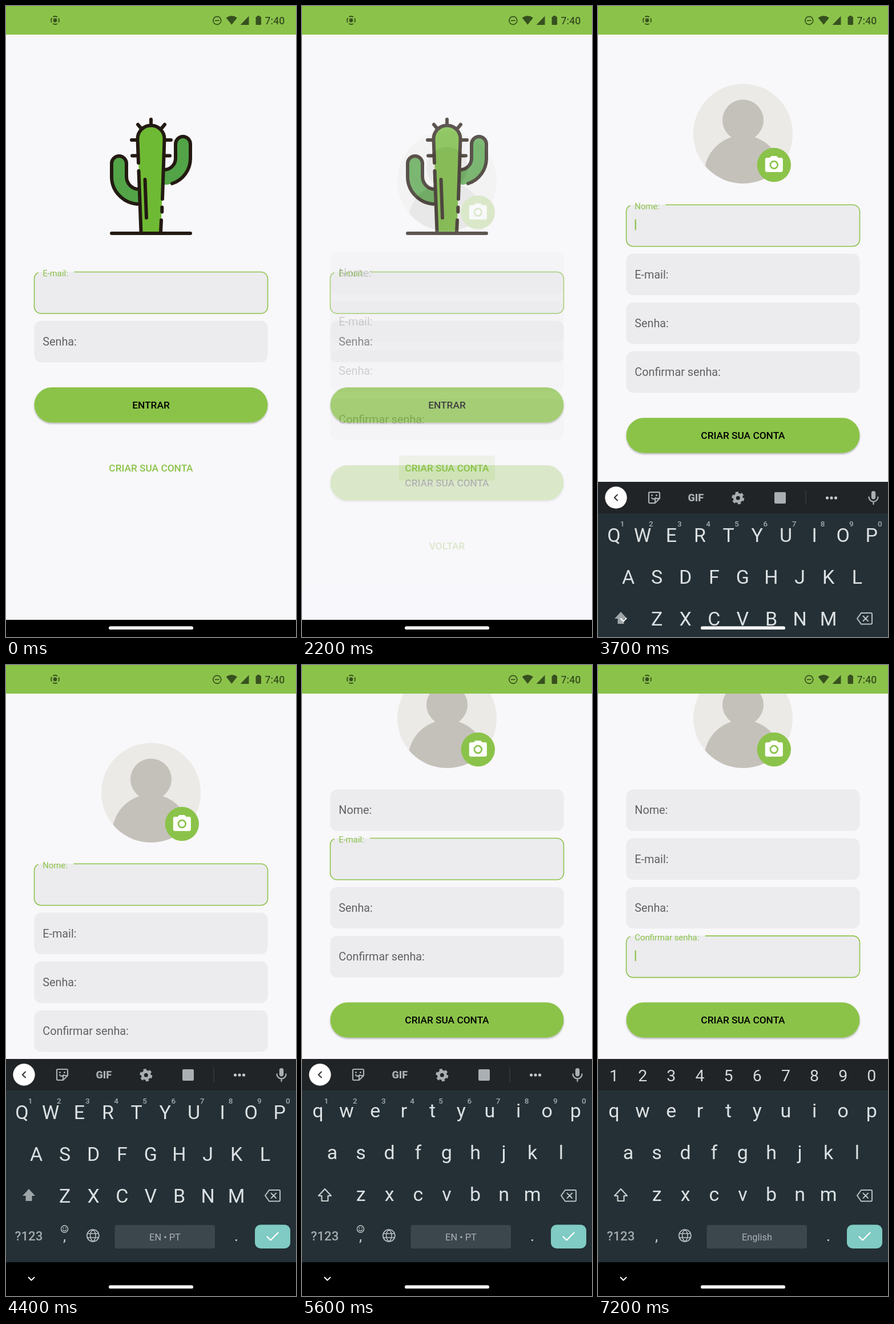
Recreate the animation shown at these times as an HTML page. Size 508x1102 px, loop 7.3 s.

```html
<!DOCTYPE html>
<html lang="pt">
<head>
<meta charset="utf-8">
<title>Criar conta</title>
<style>
  html, body { margin: 0; width: 100%; height: 100%; overflow: hidden; background: #f8f7fa; }
  svg { display: block; width: 100vw; height: 100vh; font-family: Roboto, sans-serif; }
  .mid { text-anchor: middle; }
  .btn { font-size: 17.3px; font-weight: 500; text-anchor: middle; }
  .key { font-size: 34px; fill: #dce1e3; text-anchor: middle; }
  .line { fill: none; stroke-linecap: round; stroke-linejoin: round; }
</style>
</head>
<body>
<svg id="stage" viewBox="0 0 508 1102"></svg>
<script>
const GREEN = '#8bc34a', PAPER = '#f8f7fa', BARK = '#231a12', DARK = '#37501f', ICON = '#a9afb2';
const LOOP = 7300, STEP = 100;
const stage = document.getElementById('stage');

const text = (x, y, str, attrs = '') => `<text x="${x}" y="${y}" ${attrs}>${str}</text>`;
const rect = (x, y, w, h, r, fill, attrs = '') =>
  `<rect x="${x}" y="${y}" width="${w}" height="${h}" rx="${r}" fill="${fill}" ${attrs}/>`;
const circle = (x, y, r, fill, attrs = '') => `<circle cx="${x}" cy="${y}" r="${r}" fill="${fill}" ${attrs}/>`;
const line = (d, color, width, attrs = '') =>
  `<path class="line" d="${d}" stroke="${color}" stroke-width="${width}" ${attrs}/>`;
const ring = (x, y, r, color, width, attrs = '') =>
  circle(x, y, r, 'none', `stroke="${color}" stroke-width="${width}" ${attrs}`);

const field = (id, top, label) => `<g id="${id}" data-top="${top}">
  ${rect(49.5, top, 409, 72.5, 12, '#ecebee')}
  <path class="line outline" stroke="${GREEN}" stroke-width="1.6"/>
  ${text(64.3, top + 43, label, 'class="label"')}
  ${rect(64.6, top + 25.5, 2.2, 18.5, 0, GREEN, 'class="cursor"')}</g>`;

const button = (y, label) =>
  rect(49.5, y, 409, 61.5, 30.7, GREEN, 'filter="url(#shadow)"') +
  text(254, y + 37, label, 'class="btn"');

const cactus = () => `
  <path fill="#52a447" d="M236 346A51 48 0 0 1 185 298V275a13 13 0 0 1 26 0V298a22 22 0 0 0 25 22Z"/>
  <path fill="#52a447" d="M274 286A23 22 0 0 0 297 266V241a13 13 0 0 1 26 0V266A46 46 0 0 1 274 312Z"/>
  <path fill="#6fba34" d="M237 396L230.5 232a23.5 23.5 0 0 1 47 0L271 396Z"/>` +
  line(`M234 346A49 48 0 0 1 185 298V275a13 13 0 0 1 26 0V298a22 22 0 0 0 22 22
    M278 286A20 20 0 0 0 297 266V241a13 13 0 0 1 26 0V266A46 46 0 0 1 291 310
    M232 274L230.5 232a23.5 23.5 0 0 1 47 0L274 337M273.3 351.500V359.500M272 374L271 395
    M232.500 288L236.500 395M243.500 303L246 370M185 397H323
    M254 198V207M231 207L236 213M278 207L273 213
    M220 234H229M221 261.500H230M280 234H289M279 261.500H287`, BARK, 6);

const avatar = () =>
  circle(254, 223, 87, '#ebeae6') +
  `<g clip-path="url(#face)" fill="#c4c1ba">${circle(254, 199.500, 36, '#c4c1ba')}${circle(254, 294, 68, '#c4c1ba')}</g>` +
  circle(308.3, 277.5, 29.7, GREEN) +
  `<path fill="#fff" transform="translate(289.700 258.900) scale(1.55)" fill-rule="evenodd"
    d="M9 2L7.170 4H4a2 2 0 0 0-2 2V18a2 2 0 0 0 2 2H20a2 2 0 0 0 2-2V6a2 2 0 0 0-2-2H16.830L15 2ZM12 7a5 5 0 0 1 0 10a5 5 0 0 1 0-10Z"/>` +
  circle(308.3, 277.5, 5, '#fff');

const statusBar = () =>
  rect(0, 0, 508, 50, 0, GREEN) +
  circle(86, 25, 3.4, DARK) + ring(86, 25, 7, DARK, 1.8, 'stroke-dasharray="8 3" stroke-dashoffset="4"') +
  ring(369.8, 25.3, 7, DARK, 1.7) + line('M366.500 25.300H373', DARK, 1.7) +
  `<path fill="${DARK}" d="M385.500 20.500Q395.300 13.500 405 20.500L395.300 32.800ZM410.500 33L425.500 17.500V33Z"/>` +
  rect(437.5, 18.5, 9.5, 14.5, 1.5, DARK) + rect(440, 17, 4.5, 3, 0, DARK) +
  text(453.5, 31.7, '7:40', `font-size="17.6" font-weight="500" fill="${DARK}"`);

const firstX = i => 28 + 50.15 * i, nextX = i => 53 + 50.1 * i;

function letters(id, base, upper) {
  const rows = [['qwertyuiop', firstX], ['asdfghjkl', nextX], ['zxcvbnm', i => nextX(i + 1)]];
  const keys = rows.map(([row, at], r) => [...row].map((c, i) =>
    text(at(i), base + 73 * r, upper ? c.toUpperCase() : c, 'class="key"')).join('')).join('');
  const arrow = 'M40 915L51 927H45.500V936H34.500V927H29Z';
  const shift = upper ? `<path d="${arrow}" fill="#9fa6a9"/>` : line(arrow, '#c8cdcf', 2.2);
  return `<g id="${id}">${keys}${shift}</g>`;
}

const digits = (y, dx, attrs) =>
  [...'1234567890'].map((d, i) => text(firstX(i) + dx, y, d, `class="mid" ${attrs}`)).join('');

const toolbar = () => `<g id="toolbar">` +
  circle(31.5, 715.5, 19.2, '#fff') + line('M34 710.500L28.800 715.500L34 720.500', '#30363a', 2) +
  line('M89 708a2 2 0 0 1 2-2H106a2 2 0 0 1 2 2V717L100 725H91a2 2 0 0 1-2-2ZM108 717H102a2 2 0 0 0-2 2V725M94 716Q97 720 101 716', ICON, 2.2) +
  circle(94.5, 711.5, 1.5, ICON) + circle(102.5, 711.5, 1.5, ICON) +
  text(171.3, 722, 'GIF', `class="mid" font-size="18" font-weight="900" fill="${ICON}"`) +
  ring(245.3, 716.3, 6, ICON, 5) + ring(245.3, 716.3, 9, ICON, 4, 'stroke-dasharray="5.1 4.325"') +
  rect(309, 706, 20, 20, 2, ICON) +
  rect(363.5, 703, 1.2, 25, 0, '#3a4246') +
  [401.5, 409, 416.5].map(x => circle(x, 716, 2.6, '#c3c8ca')).join('') +
  rect(478.8, 704, 7.4, 14.5, 3.7, ICON) + line('M474.500 714.500a8 8 0 0 0 16 0M482.500 723V727', ICON, 2.3) +
  digits(766, 14.6, 'font-size="13.500" font-weight="500" fill="#a3abae"') +
  ring(102.5, 985, 6, '#c3c8ca', 1.4) + line('M99.500 986.500Q102.500 990 105.500 986.500', '#c3c8ca', 1.3) +
  circle(100.3, 983.3, 1, '#c3c8ca') + circle(104.7, 983.3, 1, '#c3c8ca') + '</g>';

const keyboard = () => `<g id="keyboard">` +
  rect(0, 688, 508, 420, 0, '#243036') + rect(0, 688, 508, 55, 0, '#202427') +
  rect(0, 1043, 508, 60, 0, '#000') +
  toolbar() +
  `<g id="numbers">${digits(727, 0, 'font-size="28.500" fill="#d5d9db"')}</g>` +
  letters('caps', 792.7, true) + letters('small', 790, false) +
  line('M461 917H478a2 2 0 0 1 2 2V934.500a2 2 0 0 1-2 2H461L454 926.700ZM464.500 922.500L473 931M473 922.500L464.500 931', '#b9bfc2', 2) +
  text(40, 1004.5, '?123', 'class="mid" font-size="22.300" font-weight="500" fill="#a3abae"') +
  text(102.5, 1006, ',', 'class="mid" font-size="26" fill="#c9ced0"') +
  text(403.5, 1006, '.', 'class="mid" font-size="28" fill="#c9ced0"') +
  ring(152.3, 996.5, 10.5, '#b9bfc2', 1.7) +
  line('M142.500 993H162M142.500 1000H162M152.300 986C146 992 146 1001 152.300 1007C158.600 1001 158.600 992 152.300 986', '#b9bfc2', 1.6) +
  rect(190.5, 978, 175.5, 41, 3.5, '#3c464d') +
  text(278.5, 1004.5, '', 'id="language" class="mid" font-size="16.400" fill="#a9b1b5"') +
  rect(436, 977.5, 62, 41.5, 10, '#80cbc4') + line('M457.500 998.500L463.500 1004.500L476.500 991.500', '#fff', 2.3) +
  '</g>';

stage.innerHTML = `<defs>
  <filter id="shadow" x="-5%" y="-20%" width="110%" height="150%">
    <feDropShadow dx="0" dy="2" stdDeviation="1.500" flood-opacity=".28"/></filter>
  <clipPath id="face"><circle cx="254" cy="223" r="87"/></clipPath>
  <clipPath id="touch">${rect(170, 785, 168, 44, 4, '#000')}</clipPath></defs>
  ${rect(0, 0, 508, 1102, 0, PAPER)}
  <g id="login">${cactus()}${field('loginEmail', 464.5, 'E-mail:')}${field('loginPass', 549.7, 'Senha:')}
    ${button(666, 'ENTRAR')}
    <g clip-path="url(#touch)"><circle id="ripple" cx="254" cy="807" fill="${GREEN}" opacity=".14"/></g>
    ${text(254, 813.2, 'CRIAR SUA CONTA', `class="btn" fill="${GREEN}"`)}</g>
  <g id="signup">${rect(0, 50, 508, 1022, 0, PAPER)}<g id="form">${avatar()}
    ${field('name', 347.2, 'Nome:')}${field('email', 432.5, 'E-mail:')}
    ${field('pass', 517.8, 'Senha:')}${field('confirm', 603.1, 'Confirmar senha:')}
    ${button(719.2, 'CRIAR SUA CONTA')}
    ${text(254, 866.4, 'VOLTAR', `class="btn" fill="${GREEN}"`)}</g></g>
  ${statusBar()}
  ${rect(0, 1072, 508, 30, 0, '#000')}
  ${keyboard()}
  ${line('M39.500 1069.500L44.500 1074.500L49.500 1069.500', '#fff', 2, 'id="chevron"')}
  ${rect(180, 1083.3, 148, 5.8, 2.9, '#f4f4f4')}`;

const $ = id => document.getElementById(id);
const clamp = x => Math.min(1, Math.max(0, x));
const show = (id, on) => $(id).setAttribute('display', on ? 'inline' : 'none');

// Material standard curve, cubic-bezier(.4, 0, .2, 1)
function ease(x) {
  x = clamp(x);
  let lo = 0, hi = 1;
  for (let i = 0; i < 24; i++) {
    const u = (lo + hi) / 2, v = 1 - u;
    if (1.2 * v * v * u + 0.6 * v * u * u + u ** 3 < x) lo = u; else hi = u;
  }
  return 3 * lo * lo - 2 * lo ** 3;
}

// start and end of focus for each field, in ms
const focus = {
  loginEmail: [-700, Infinity], loginPass: [Infinity, Infinity],
  name: [3500, 5000], email: [5000, 5900], pass: [5900, 6800], confirm: [6800, Infinity]
};
const fields = Object.keys(focus).map(id => {
  const g = $(id), label = g.querySelector('.label');
  return { span: focus[id], top: +g.dataset.top, label,
    outline: g.querySelector('.outline'), cursor: g.querySelector('.cursor') };
});

function drawField({ span: [from, to], top, label, outline, cursor }, t) {
  const active = t >= from && t < to;
  const lift = ease((t - from) / 167) - ease((t - to) / 167);
  label.setAttribute('font-size', 19.8 - 4.95 * lift);
  label.setAttribute('y', top + 43 - 35.3 * lift);
  label.setAttribute('fill', active ? GREEN : '#616064');
  const gap = 64.3 + label.getComputedTextLength() + 11;
  outline.setAttribute('d', `M${gap} ${top}H446.500a12 12 0 0 1 12 12V${top + 60.5}a12 12 0 0 1-12 12
    H61.500a12 12 0 0 1-12-12V${top + 12}A12 12 0 0 1 56 ${top + 1.3}`);
  outline.setAttribute('opacity', lift);
  cursor.setAttribute('opacity', +(active && (t - from) % 1000 < 500));
}

function draw(t) {
  fields.forEach(f => drawField(f, t));

  const press = ease((t - 1450) / 250);
  $('ripple').setAttribute('r', press * 95);

  const enter = 88 * (1 - ease((t - 2150) / 350));
  const scroll = 130 * ease((t - 5000) / 250);
  $('signup').setAttribute('opacity', clamp((t - 2146) / 200));
  $('form').setAttribute('transform', `translate(0 ${enter - scroll})`);

  const open = ease((t - 3580) / 285);
  $('keyboard').setAttribute('transform', `translate(0 ${414 * (1 - open)})`);
  show('keyboard', open > 0);
  show('chevron', open > 0);

  const secret = t >= 5900;
  show('toolbar', !secret);
  show('numbers', secret);
  show('caps', t < 5000);
  show('small', t >= 5000);
  $('language').textContent = secret ? 'English' : 'EN • PT';
}

function tick() {
  const t = performance.now() % LOOP;
  draw(Math.floor(t / STEP) * STEP);
  requestAnimationFrame(tick);
}
tick();
</script>
</body>
</html>
```
